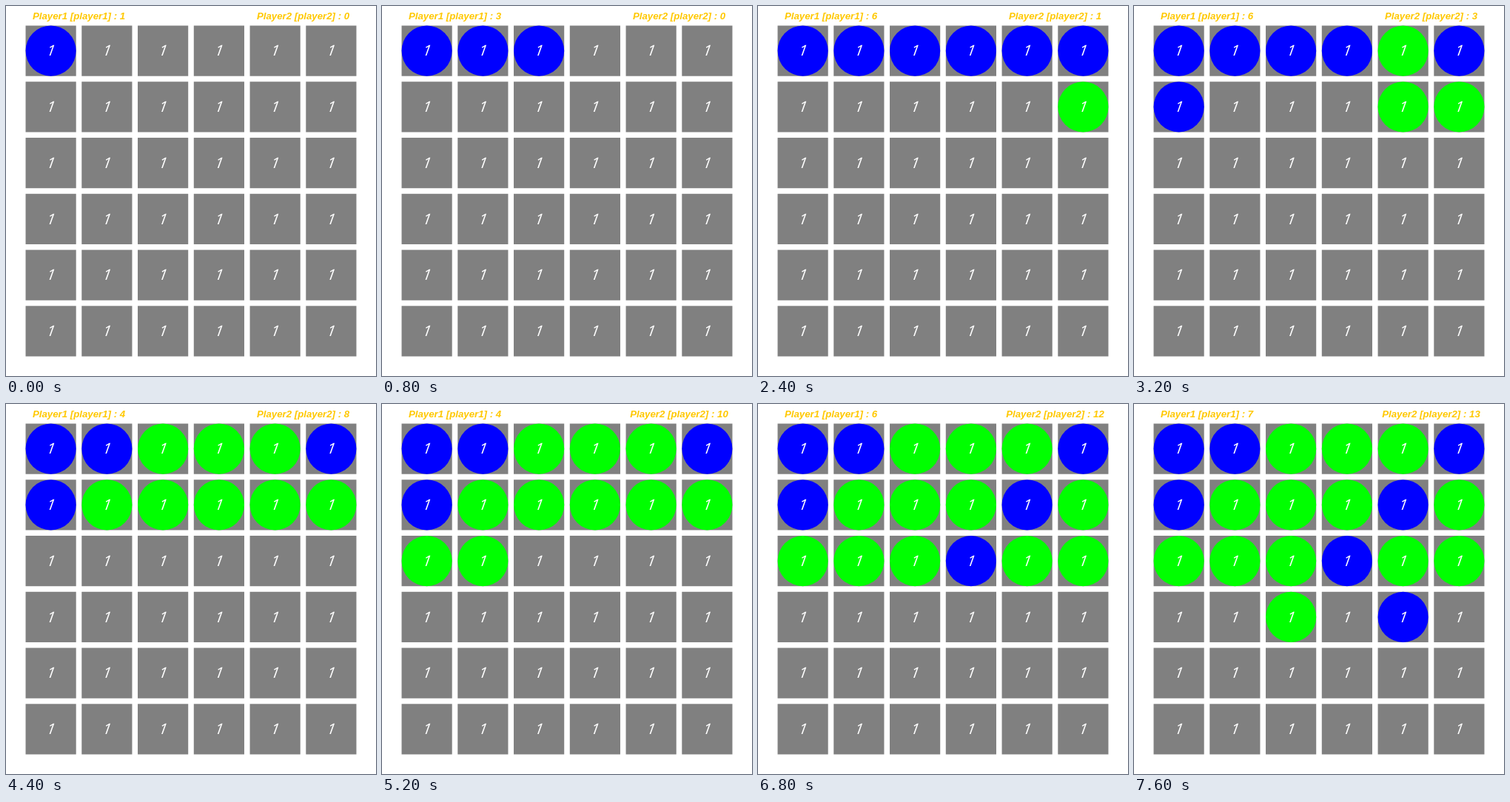
An HTML page that plays this animation: 500 by 500 pixels, repeating every 8000 ms.

```html
<!DOCTYPE html>
<html lang="en">
<head>
<meta charset="utf-8">
<title>Board game</title>
<style>
  html, body { margin: 0; height: 100%; overflow: hidden; background: #fff; }
  svg { display: block; width: 100vw; height: 100vh; }
  .score { font: italic bold 13.25px "Liberation Sans", Arial, sans-serif; fill: #ffc800; text-anchor: middle; }
  .value { font: italic 400 20px "Open Sans", sans-serif; fill: #fff; text-anchor: middle; }
  .cell { fill: #808080; }
  .b { fill: #00f; }
  .g { fill: #0f0; }
  .none { fill: none; }
</style>
</head>
<body>
<svg id="stage" viewBox="0 0 500 500">
  <text class="score" x="98.5" y="17.6"></text>
  <text class="score" x="401.5" y="17.6"></text>
</svg>
<script>
const SIZE = 6, STEP = 400;
const UNIT = 500 / 660; // the board is laid out on a 660 unit square
const stage = document.getElementById('stage');
const scores = stage.querySelectorAll('.score');

// Each turn: row, column and new owner of every cell that changes.
const turns = [
  '00b', '02g', '01b 02b', '04g', '03b 04b',
  '15g', '05b', '14g 04g', '10b', '13g 03g',
  '11b', '12g 11g 02g', '20b', '21g 20g', '23b',
  '22g', '24b 14b', '25g 24g', '34b', '32g'
].map(turn => turn.split(' '));

function add(tag, attrs, text = '') {
  const el = document.createElementNS('http://www.w3.org/2000/svg', tag);
  for (const key in attrs) el.setAttribute(key, attrs[key]);
  el.textContent = text;
  return stage.appendChild(el);
}

const discs = {};
for (let row = 0; row < SIZE; row++) {
  for (let col = 0; col < SIZE; col++) {
    const x = (35 + col * 100) * UNIT, y = (35 + row * 100) * UNIT;
    const side = 90 * UNIT, r = side / 2;
    add('rect', { class: 'cell', x, y, width: side, height: side });
    discs[`${row}${col}`] = add('circle', { class: 'none', cx: x + r, cy: y + r, r });
    add('text', {
      class: 'value',
      transform: `translate(${x + r - 0.6} ${y + r + 6.8}) skewX(-8)`
    }, '1');
  }
}

function show(step) {
  const owners = {};
  for (const turn of turns.slice(0, step + 1)) {
    for (const change of turn) owners[change.slice(0, 2)] = change[2];
  }
  for (const key in discs) discs[key].setAttribute('class', owners[key] || 'none');
  ['b', 'g'].forEach((side, i) => {
    const count = Object.values(owners).filter(owner => owner === side).length;
    scores[i].textContent = `Player${i + 1} [player${i + 1}] : ${count}`;
  });
}

let shown = -1;
const start = performance.now();
function tick() {
  const step = Math.floor((performance.now() - start) / STEP) % turns.length;
  if (step !== shown) show(shown = step);
  requestAnimationFrame(tick);
}
tick();
</script>
</body>
</html>
```
